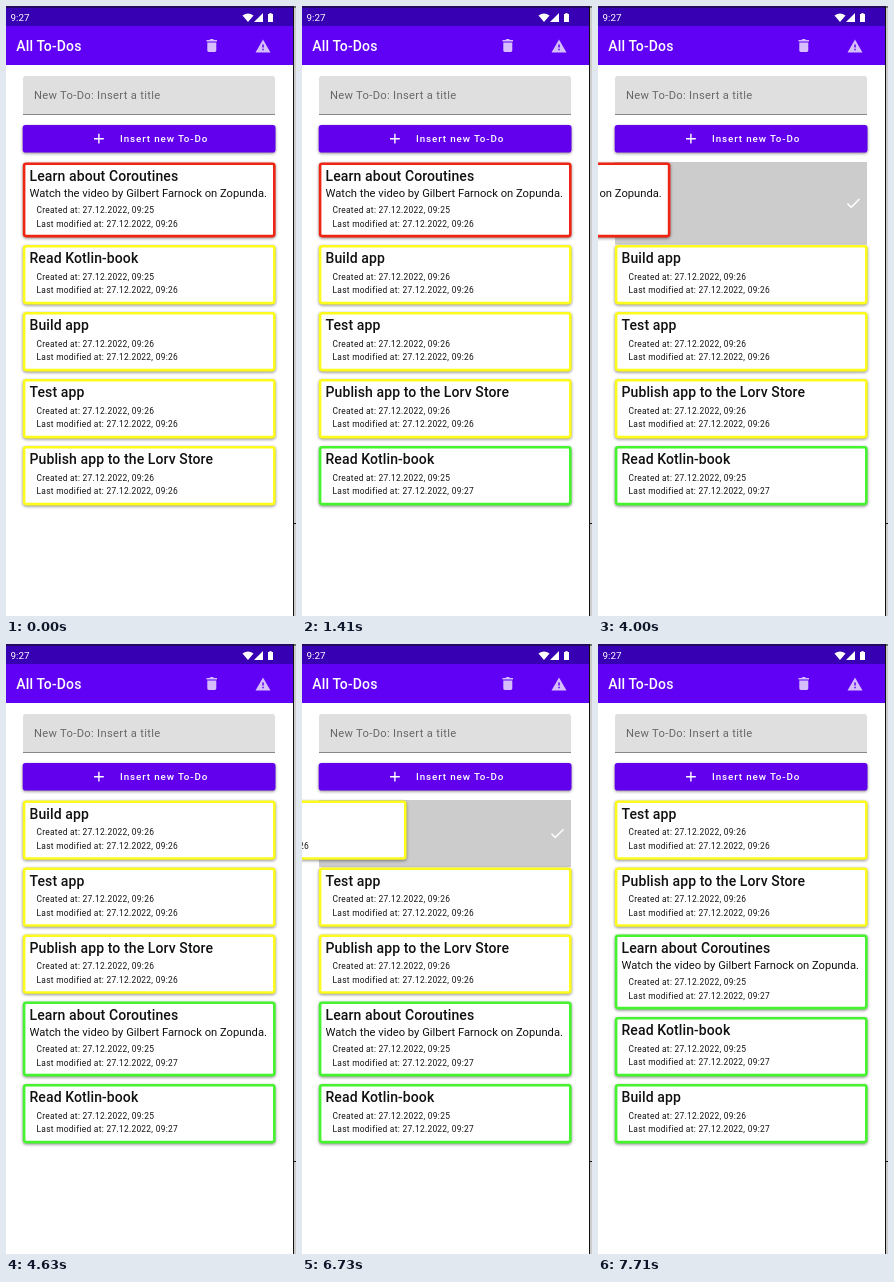
An HTML page for the animation above (8000 ms loop, 290 by 610 pixels).

```html
<!DOCTYPE html>
<html lang="en">
<head>
<meta charset="utf-8">
<title>All To-Dos</title>
<style>
  html, body { margin: 0; width: 100%; height: 100%; overflow: hidden; background: #fff; }
  svg { display: block; width: 290px; height: 610px; font-family: Roboto, sans-serif; }
  .title { font-size: 14px; font-weight: 500; letter-spacing: .1px; }
  .heading { font-size: 14px; font-weight: 500; letter-spacing: .17px; }
  .field { font-size: 11.2px; letter-spacing: .31px; }
  .note { font-size: 11.2px; }
  .date { font-size: 8.4px; letter-spacing: .29px; }
  .button { font-size: 9.8px; font-weight: 500; letter-spacing: .9px; }
  .clock { font-size: 9.8px; }
  .ink { fill: #111; }
  .raised { filter: drop-shadow(0 1.2px 1.6px rgba(0, 0, 0, .45)); }
</style>
</head>
<body>
<svg viewBox="0 0 290 610">
  <rect width="288" height="20" fill="#3700b3"/>
  <rect y="20" width="288" height="39" fill="#6000f4"/>
  <g fill="#fff">
    <text class="clock" x="4.5" y="15">9:27</text>
    <path d="M236.5 9.5Q242 5.5 247.500 9.5L242 16Z"/>
    <path d="M248 16L257 7V16Z"/>
    <path d="M262 8h1.500v-1h2v1h1.500v8h-5Z"/>
    <text class="heading" x="10.300" y="45">All To-Dos</text>
    <g opacity=".74">
      <path d="M200.500 34h3l1-1h2.500l1 1h3v1.500h-10.500ZM201.300 36.400h9v8.200q0 1.400-1.400 1.400h-6.200q-1.400 0-1.400-1.400Z"/>
      <path fill-rule="evenodd" d="M257 33.500L264.500 46.500H249.500ZM256.300 38.500v3h1.500v-3ZM256.300 42.800v1.500h1.500v-1.500Z"/>
    </g>
  </g>

  <path d="M17 108V73q0-3 3-3h246q3 0 3 3v35Z" fill="#dfdfdf"/>
  <rect x="17" y="108" width="252" height="1" fill="#888"/>
  <text class="field" x="28" y="93" fill="#686868">New To-Do: Insert a title</text>

  <rect class="raised" x="16.700" y="119" width="252.800" height="27.500" rx="2.800" fill="#6200ee"/>
  <path d="M88 132.700h9.800M92.900 127.800v9.800" stroke="#fff" stroke-width="1.400"/>
  <text class="button" x="114" y="136.300" fill="#fff">Insert new To-Do</text>

  <g id="list"></g>

  <rect x="288" width="2" height="610" fill="#ccc"/>
  <path d="M0 1H290M287.500 0V610M288 517.500h2" stroke="#111"/>
</svg>
<script>
const LOOP = 8000, STEP = 70, LEFT = 17, WIDTH = 252;
const YELLOW = '#fdfb1c', GREEN = '#45f32e', RED = '#f02413';

const todos = {
  learn: { title: 'Learn about Coroutines', note: 'Watch the video by Gilbert Farnock on Zopunda.', created: 25, color: RED },
  read: { title: 'Read Kotlin-book', created: 25, color: YELLOW },
  build: { title: 'Build app', created: 26, color: YELLOW },
  test: { title: 'Test app', created: 26, color: YELLOW },
  publish: { title: 'Publish app to the Lorv Store', created: 26, color: YELLOW },
};

// Each swipe drags a card left, then the finished to-do moves to a new index.
const swipes = [
  { id: 'read', start: 500, steps: 12, reach: 153, settle: 1410, index: 4 },
  { id: 'learn', start: 3510, steps: 11, reach: 160, settle: 4630, index: 3 },
  { id: 'build', start: 6240, steps: 12, reach: 165, settle: 7710, index: 4 },
];

function dragOffset({ start, steps, reach }, t) {
  const step = Math.min(Math.floor((t - start) / STEP), steps - 1);
  const release = steps - 5;
  if (step <= release) return 11.5 + (reach - 11.5) * (step / release) ** 1.15;
  const rest = 1 - (step - release) / 4;
  return WIDTH - (WIDTH - reach) * rest ** 1.8;
}

const text = (cls, x, y, content) => `<text class="${cls} ink" x="${x}" y="${y}">${content}</text>`;

function card({ title, note, created, color }, done) {
  const shift = note ? 15.6 : 0;
  const date = (label, y, minute) => text('date', 30.5, y + shift, `${label} at: 27.12.2022, 09:${minute}`);
  return `<rect class="raised" x="18.100" y="1.700" width="250.200" height="${56.8 + shift}" rx="2"
      fill="#fff" stroke="${done ? GREEN : color}" stroke-width="2.600"/>` +
    text('title', 23.5, 18.8, title) +
    (note ? text('note', 23.5, 34.8, note) : '') +
    date('Created', 35.2, created) +
    date('Last modified', 48.9, done ? 27 : 26);
}

function backdrop(height, offset) {
  const scale = offset > WIDTH / 2 ? 1 : .75;
  return `<rect x="${LEFT}" width="${WIDTH}" height="${height}" fill="#ccc"/>
    <path transform="translate(255.500 ${height / 2}) scale(${scale})" d="M-6 .3L-2.300 4L6-4.300"
      fill="none" stroke="#fff" stroke-width="1.500"/>`;
}

function render(t) {
  const order = ['learn', 'read', 'build', 'test', 'publish'];
  const done = new Set();
  let active = null;
  for (const swipe of swipes) {
    if (t >= swipe.settle) {
      order.splice(order.indexOf(swipe.id), 1);
      order.splice(swipe.index, 0, swipe.id);
      done.add(swipe.id);
    } else if (t >= swipe.start) active = swipe;
  }
  let top = 156;
  return order.map(id => {
    const height = todos[id].note ? 82.6 : 67;
    const offset = active && active.id === id ? dragOffset(active, t) : 0;
    const row = `<g transform="translate(0 ${top})">${offset ? backdrop(height, offset) : ''}
      <g transform="translate(${-offset} 0)">${card(todos[id], done.has(id))}</g></g>`;
    top += height;
    return row;
  }).join('');
}

const list = document.getElementById('list');
let shown = '';
function frame() {
  const markup = render(performance.now() % LOOP);
  if (markup !== shown) list.innerHTML = shown = markup;
  requestAnimationFrame(frame);
}
frame();
</script>
</body>
</html>
```
